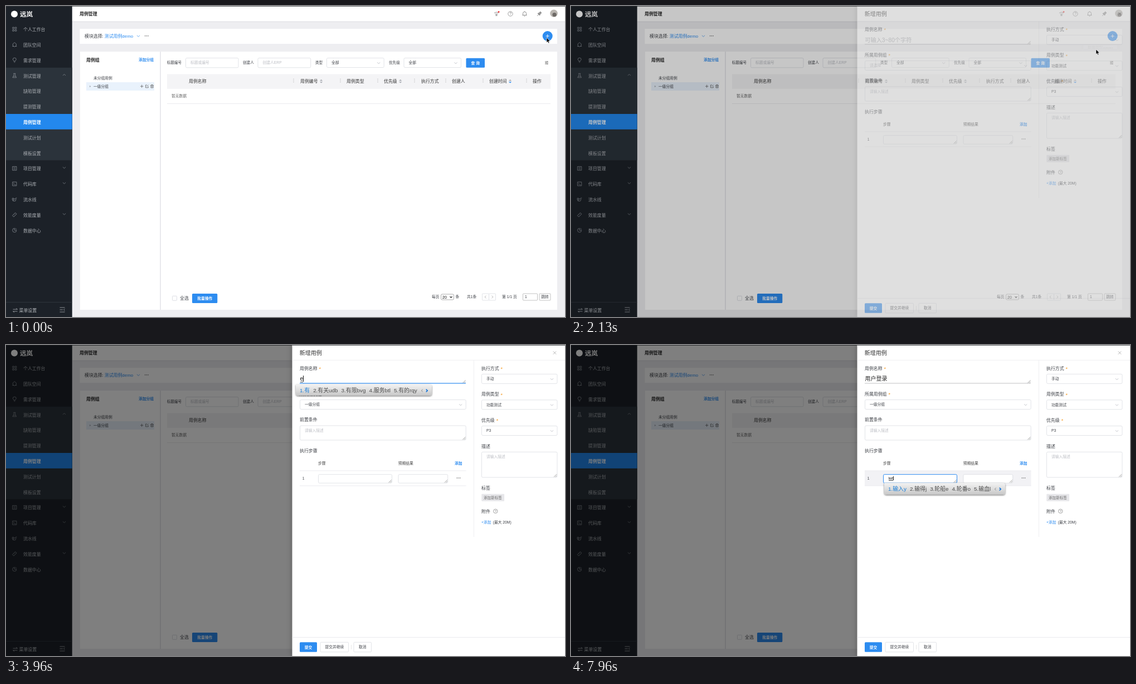
An HTML page that plays this animation: 1003x559 px, repeating every 8000 ms.

```html
<!DOCTYPE html>
<html lang="zh-CN">
<head>
<meta charset="utf-8">
<title>新增用例</title>
<style>
html, body { margin: 0; width: 100%; height: 100%; overflow: hidden; }
body { position: relative; background: #eeeef1; font-family: "Liberation Sans", "Noto Sans CJK SC", "Noto Sans CJK", sans-serif; }
svg { position: absolute; left: 0; top: 0; display: block; }
svg text { white-space: pre; }
.field { position: absolute; white-space: nowrap; line-height: 14px; color: #222; }
.field u { text-decoration: none; box-shadow: 0 1px #444; }
.field i { display: inline-block; width: .8px; height: 1.15em; margin-left: .4px; background: #111; vertical-align: -.2em; }
#title { left: 527.5px; top: 54px; font-size: 10px; }
#step { left: 569.5px; top: 233px; font-size: 6.75px; }
#ime {
  position: absolute; display: flex; gap: 6px; align-items: center; height: 20.5px; padding: 0 6px 0 7px;
  font-size: 9.9px; color: #4a4a4a; white-space: nowrap; border-radius: 1px 4px 4px 4px;
  background: linear-gradient(#f2f2f2, #dcdcdc 55%, #c6c6c6); box-shadow: 0 1px 3px rgba(0,0,0,.55);
}
#ime span:first-child { color: #1b7fd8; }
#ime svg { position: static; }
</style>
</head>
<body>
<svg id="scene" width="1003" height="559"></svg>
<div class="field" id="title"></div>
<div class="field" id="step"></div>
<div id="ime"></div>
<svg id="pointer" width="1003" height="559">
  <path id="arrow" d="M0 0V8.7L2 6.9L3.4 10L4.9 9.3L3.6 6.3H6.3Z" fill="#000" stroke="#fff" stroke-width=".6"/>
  <path id="beam" d="M-2-4.2Q0-4.2 0-3V3Q0 4.2-2 4.2M2-4.2Q0-4.2 0-3M0 3Q0 4.2 2 4.2M-1 1H1" fill="none" stroke="#111" stroke-width=".9"/>
</svg>
<script>
const $ = id => document.getElementById(id);
const BLUE = '#2d8cf0', INK = '#3c3f45', SOFT = '#bcbec4', EDGE = '#d6d9df', S = 6.75, M = 7.9;

// Drawing helpers; text is placed by its left edge and vertical centre.
const text = (x, y, s, size = S, fill = INK, bold, mid) =>
  `<text x="${x}" y="${y + size * .37}" font-size="${size}" fill="${fill}"${bold ? ' font-weight="bold"' : ''}${mid ? ' text-anchor="middle"' : ''}>${s}</text>`;
const rect = (x, y, w, h, fill, edge = 'none', r = 0, extra = '') =>
  `<rect x="${x}" y="${y}" width="${w}" height="${h}" rx="${r}" fill="${fill}" stroke="${edge}" stroke-width=".7" ${extra}/>`;
const path = (x, y, d, color = '#666', w = .8, fill = 'none') =>
  `<path transform="translate(${x} ${y})" d="${d}" fill="${fill}" stroke="${color}" stroke-width="${w}"/>`;
const circle = (x, y, r, fill, edge = 'none') =>
  `<circle cx="${x}" cy="${y}" r="${r}" fill="${fill}" stroke="${edge}" stroke-width=".7"/>`;
const chevron = (x, y, color = '#a9adb5', up) => path(x, y, up ? 'M-2.6 1.2L0-1.2L2.6 1.2' : 'M-2.6-1.2L0 1.2L2.6-1.2', color, .7);
const dots = (x, y, color = '#555') => [-2.7, 0, 2.7].map(d => circle(x + d, y, .75, color)).join('');
const line = (x, y, w, color = '#e6e7ea') => rect(x, y, w, .8, color);
const button = (x, y, w, h, s) => rect(x, y, w, h, BLUE, 'none', 1.5) + text(x + w / 2, y + h / 2, s, S, '#fff', 1, 1);
const input = (x, y, w, h, s = '', color = SOFT) => rect(x, y, w, h, '#fff', EDGE, 2) + text(x + 8.5, y + Math.min(h / 2, 8.5), s, S, color);
const select = (x, y, w, s) => input(x, y, w, 17, s, INK) + chevron(x + w - 9.5, y + 9);
const grip = (x, y) => path(x, y, 'M-5 0L0-5M-2.3 0L0-2.3', '#777', .7);
const area = (x, y, w, h, s) => input(x, y, w, h, s) + grip(x + w - .8, y + h - .8);
const label = (x, y, s, star) => text(x, y, s, M) + (star ? text(x + s.length * M + 3, y + 1, '*', 9, '#f59a23') : '');
const help = (x, y, r) => circle(x, y, r, 'none', '#777') + text(x, y, '?', r * 1.6, '#777', 0, 1);

function sidebar() {
  const menu = [
    ['个人工作台', 'M-3.5-3.5h2.6v2.6h-2.6zM.9-3.5h2.6v2.6H.9zM-3.5.9h2.6v2.6h-2.6zM.9.9h2.6v2.6H.9z'],
    ['团队空间', 'M0-3.8L3-1.5V2L0 3.8L-3 2V-1.5ZM-4 3H-1M1 3H4'],
    ['需求管理', 'M-1.4 2V1Q-3 0-3-1.2A3 3 0 0 1 3-1.2Q3 0 1.4 1V2ZM-1 3.8H1'],
    ['测试管理', 'M-2-3.8H2M-1.2-3.8V-.8L-3.4 3.6H3.4L1.2-.8V-3.8M-2.2 1.2H2.2', 1],
    ['缺陷管理'], ['提测管理'], ['用例管理'], ['测试计划'], ['模板设置'],
    ['项目管理', 'M-3.6-3.4H3.6V3.4H-3.6ZM-2-1.2H2M-2 1.2H2', 2],
    ['代码库', 'M-3.6-3.4H3.6V3.4H-3.6ZM-2-1.4L-.6 0L-2 1.4M0 1.6H2', 2],
    ['流水线', 'M-4-2H-1.5V1H-4ZM-1.5-.5H1L2.5-2.5H4M-2.8 1V3H1.5L3-1'],
    ['效能度量', 'M-3.8 1.4L1.4-3.8L3.8-1.4L-1.4 3.8ZM-1.5-.9L-.4.2M.4-2.4L1.2-1.6', 2],
    ['数据中心', 'M3.6 0A3.6 3.6 0 1 1 0-3.6V0ZM1.4-3.5A3.6 3.6 0 0 1 3.5-1.4'],
  ];
  let out = rect(0, 0, 118.7, 559, '#1c2128') + rect(0, 110.8, 118.7, 166.5, '#2b333b') + rect(0, 194, 118.7, 27.8, '#2388ee');
  out += circle(15, 14.5, 6, '#fff') + text(25, 14.5, '远岚', 11.5, '#fff', 1);
  menu.forEach(([name, icon, fold], i) => {
    const y = 42.2 + i * 27.8, on = i == 6;
    out += text(31, y, name, M, on ? '#fff' : '#a9adb2', on);
    if (icon) out += path(15.3, y - .5, icon, '#8d9298', .75);
    if (fold) out += chevron(104.5, y - 1.8, '#8d9298', fold == 1);
  });
  return out + line(0, 532, 118.7, '#343a41') + text(23.5, 547, '菜单设置', M, '#b4b8bc') +
    path(16.5, 547, 'M-4-1.8H4M1.5-3.6L4-1.8M4 1.8H-4L-1.5 3.6', '#a9adb2') + path(101, 546, 'M-4.5-4H4.5M-4.5 0H1M-4.5 4H4.5M4.5-1.8L2.5 0L4.5 1.8', '#a9adb2');
}

function page() {
  let out = rect(118.7, 0, 884.3, 559, '#eeeef1') + rect(118.7, 27.5, 884.3, 1.5, '#e2e2e6') + rect(118.7, 0, 884.3, 27.5, '#fff');
  out += text(132, 14, '用例管理', M, '#222', 1);
  out += path(880, 14, 'M-4-1.5Q0-4.5 4-1.5M-2.4.4H2.6M0 .4V4M-2 3H2', '#777') + circle(884, 10.5, 1.5, '#ee3b3b') + help(905, 14, 4.2);
  out += path(930.5, 14, 'M-4 2.6H4M-3 2.6V-.6A3 3 0 0 1 3-.6V2.6M-1 4.2H1M0-3.6V-4.5', '#777') + path(957, 14, 'M-4 4L-1 1M-3-.6L.6 3L2-.2L4-1.6L1.6-4L.2-2Z', '#777', .7, '#999');
  out += circle(983, 13.3, 6.8, '#b9b5b0') + circle(984, 15.5, 3.6, '#6d6966');

  out += rect(132.5, 41, 856.5, 27, '#fff') + text(141, 53.7, '模块选择:', M) + text(176.8, 53.7, '测试用例demo', M, BLUE);
  out += chevron(237.5, 54, BLUE) + dots(252.3, 53.7) + circle(971.7, 54, 9, BLUE) + path(971.7, 54, 'M-3 0H3M0-3V3', '#fff', .9);

  out += rect(133, 82, 856, 464, '#fff') + rect(276.3, 82, 1.5, 464, '#e3e3e8');
  out += text(144, 97, '用例组', M, '#222', 1) + text(238, 96.3, '添加分组', S, BLUE, 1) + text(157, 129.3, '未分组用例');
  out += rect(144, 137, 122, 15, '#e9f2fc') + path(151, 144.5, 'M-1-1.8L1.2 0L-1 1.8Z', 'none', 0, '#a3a8b0') + text(157, 144.3, '一级分组');
  out += path(243.7, 144.3, 'M-2.7 0H2.7M0-2.7V2.7') + path(253, 144.3, 'M0-2.3H-2.5V2.5H2.3V0M-.6.6L2.6-2.6') + path(262, 144.3, 'M-2.8-1.8H2.8M-2-1.8V2.7H2V-1.8M-1-2.8H1M-.7-.4V1.4M.7-.4V1.4');

  [[288.7, '标题编号'], [425, '创建人'], [555, '类型'], [687, '优先级']].forEach(([x, s]) => out += text(x, 101.7, s, 6.6));
  out += input(322.5, 93.5, 94.5, 17.3, '标题或编号') + input(452, 93.5, 94.7, 17.3, '创建人ERP') + select(575.5, 93.5, 102.7, '全部') + select(714, 93.5, 102.5, '全部');
  out += button(825.5, 93.8, 33.5, 17, '查 询') + path(970, 102, 'M-3-2.2H3M-3 0H3M-3 2.2H3M1-3V-1.4M-1-.8V.8M1 1.4V3', '#555', .7);

  out += rect(289, 122.5, 688, 26.3, '#f4f4f6');
  [[328, '用例名称'], [528, '用例编号', 1], [611, '用例类型'], [678, '优先级', 1], [745, '执行方式'], [800, '创建人'], [867, '创建时间', 2], [945, '操作']].forEach(([x, s, sort]) => {
    out += text(x, 135.3, s, M, '#333');
    if (!sort) return;
    const sx = x + s.length * M + 6;
    out += path(sx, 135.3, 'M-2.6-.9L0-3.2L2.6-.9Z', 'none', 0, '#a3a6ad') + path(sx, 135.3, 'M-2.6.9L0 3.2L2.6.9Z', 'none', 0, sort == 2 ? BLUE : '#a3a6ad');
  });
  [516, 600, 667, 733, 789, 856, 934].forEach(x => [-2.7, 0, 2.7].forEach(d => out += circle(x, 134 + d, .5, '#888')));
  out += text(297, 161.3, '暂无数据', S, '#666') + line(289, 175, 688);

  out += rect(298.5, 521.3, 8, 8, '#fff', '#cfd2d8', 1) + text(312, 525, '全选', M) + button(334, 517, 45.3, 17, '批量操作');
  out += text(764, 523, '每页') + rect(780.5, 518, 23, 10, '#fff', '#888', 2) + text(783, 523, '20', 7, '#111') + path(798.5, 523, 'M-2-1L0 1.2L2-1', '#111', 1.1) + text(806.5, 523, '条');
  out += text(827, 523, '共1条') + rect(854.5, 517, 12, 12, '#fff', EDGE, 1) + rect(866.5, 517, 12, 12, '#fff', EDGE, 1);
  out += path(860.3, 523, 'M1.2-2.4L-1.2 0L1.2 2.4', '#999', .7) + path(872.7, 523, 'M-1.2-2.4L1.2 0L-1.2 2.4', '#999', .7) + text(890, 523, '第 1/1 页');
  out += rect(927.5, 517, 26, 12, '#fff', '#aaa', 1) + text(931, 523, '1') + rect(957, 517, 20, 12, '#fff', '#aaa', 1) + text(967, 523, '跳转', S, INK, 0, 1);
  return out + sidebar() + rect(0, 0, 1003, .8, '#33363a');
}

function drawer() {
  let out = rect(513.5, 0, 489.5, 559, '#fff', 'none', 0, 'style="filter:drop-shadow(0 0 5px rgba(0,0,0,.3))"') + rect(513.5, 0, 489.5, .8, '#33363a');
  out += text(526.8, 14, '新增用例', 10, '#333') + path(984.5, 14, 'M-2.7-2.7L2.7 2.7M2.7-2.7L-2.7 2.7', '#999', .7);
  out += line(513.5, 26.8, 489.5, '#ececef') + rect(839, 27, .8, 318, '#ececef') + line(513.5, 525, 489.5);
  out += label(527, 42, '用例名称', 1) + `<g id="hint">${text(527.3, 61, '可输入3~80个字符', 10.2, '#a9abb0')}</g>`;
  out += '<rect id="under" x="527" width="298"/>' + grip(824.5, 68.3);
  out += label(527, 87.7, '所属用例组', 1) + select(527.5, 98.5, 297.7, '') + `<g id="unset">${text(536, 107, '请选择', S, SOFT)}</g><g id="group">${text(536, 107, '一级分组')}</g>`;
  out += label(527, 134.5, '前置条件') + area(527.5, 145, 297.7, 26, '请输入描述') + label(527, 190, '执行步骤');
  out += text(560, 212.7, '步骤', S, '#444') + text(703.7, 212.7, '预期结果', S, '#444') + text(805, 212.7, '添加', S, BLUE, 1);
  out += rect(527, 226, 298.5, 27, '#fff', 'none', 0, 'id="row"') + line(527, 225.6, 298.5) + line(527, 252.6, 298.5) + text(531.8, 239.5, '1');
  out += rect(560.5, 232.7, 132, 15.5, '#fff', EDGE, 2, 'id="box"') + grip(691.7, 247.4) + area(704, 232.7, 88.7, 15.5) + dots(812, 239);

  out += label(853, 42, '执行方式', 1) + select(853.5, 52.3, 135.5, '手动') + label(853, 88.3, '用例类型', 1) + select(853.5, 98.8, 135.5, '功能测试');
  out += label(853, 135, '优先级', 1) + select(853.5, 145.5, 135.5, 'P3') + label(853, 182, '描述') + area(853.5, 192.3, 135.5, 45.7, '请输入描述');
  out += label(853, 257, '标签') + rect(853.3, 267.7, 40.8, 13, '#e7e7ea', 'none', 1) + text(857, 274.3, '添加新标签', 6.6, '#666');
  out += label(853, 299.3, '附件') + help(878.3, 298.7, 3.7) + text(853, 318.5, '+添加', S, BLUE) + text(873.7, 318.5, '(最大 20M)');
  out += button(527, 534.3, 31, 17.5, '提交') + rect(564, 534.3, 50.5, 17.5, '#fff', EDGE, 1.5) + text(589.3, 543, '提交并继续', S, INK, 0, 1);
  return out + rect(619, 539, .7, 8, '#ddd') + rect(624, 534.3, 31.5, 17.5, '#fff', EDGE, 1.5) + text(639.8, 543, '取消', S, INK, 0, 1);
}

const menu = rect(919, 70, 61.5, 34, '#fff', '#e4e6ea', 2, 'style="filter:drop-shadow(0 1px 3px rgba(0,0,0,.15))"') +
  text(927, 80, '新增用例') + text(927, 94, '新增xmind用例');
$('scene').innerHTML = page() + `<g id="menu">${menu}</g>` + rect(0, 0, 1003, 559, '#000', 'none', 0, 'id="mask"') + `<g id="drawer">${drawer()}</g>`;

// Time, committed text, keys being composed, candidate list.
const titleKeys = [
  [0, '', ''],
  [3960, '', 'e', '有 有关udb 有限bvg 服务btl 有的rqy'],
  [4250, '', 'et', '用 用户yn 用于gf 用品kk 及'],
  [4460, '', 'ety', '用户n 用语g 脉i 用诗f 脸w'],
  [4710, '用户', ''],
  [4880, '用户', 'w', '人 你qiy 什么ftc 会fcu 你的qrq'],
  [5050, '用户', 'wg', '全 合k 登ku 登录vi 偿i'],
  [5190, '用户', 'wgv', '登录i 例e 侄y 债u 倒j'],
  [5330, '用户登录', ''],
];
const stepKeys = [
  [0, '', ''],
  [7560, '', 'l', '国 轻c 输入wty 男l 四h'],
  [7750, '', 'lw', '输gj 输入ty 轮x 轮船te 转'],
  [7910, '', 'lwt', '输入y 输得j 轮船e 轮番o 输血l'],
];
// Pointer path: time, x, y.
const moves = [[0, 970, 57], [880, 970, 57], [1500, 942, 78], [2350, 942, 78], [2880, 586, 68], [3130, 578, 62], [5830, 578, 62], [6630, 575, 241], [8000, 575, 241]];
const FOCUS = 3400, NEXT = 7060;

const clamp = v => Math.max(0, Math.min(1, v));
const smooth = v => (v = clamp(v)) * v * (3 - 2 * v);
const last = (table, t) => table.filter(row => row[0] <= t).pop();
const show = (id, on) => $(id).style.display = on ? '' : 'none';

function type(id, keys, t, focused, since) {
  const [at, done, comp, list] = last(keys, t);
  const blink = focused && Math.floor((t - Math.max(at, since)) / 500) % 2 == 0;
  $(id).innerHTML = `${done}<u>${comp}</u>${blink ? '<i></i>' : ''}`;
  return focused && list;
}

function draw(t) {
  const open = 1 - (1 - clamp((t - 200) / 250)) ** 3;
  const scale = t < 1000 ? open : 1 - clamp((t - 1960) / 220);
  $('menu').setAttribute('transform', `translate(0 ${70 * (1 - scale)}) scale(1 ${scale})`);
  $('menu').style.opacity = scale;

  const fade = smooth((t - 1950) / 390);
  $('mask').style.opacity = fade * .5;
  $('drawer').style.opacity = fade;
  show('unset', t < 2260);
  show('group', t >= 2260);

  const inTitle = t >= FOCUS && t < NEXT, inStep = t >= NEXT;
  const list = type('title', titleKeys, t, inTitle, FOCUS) || type('step', stepKeys, t, inStep, NEXT);
  if (!inStep) $('step').innerHTML = '';
  show('hint', t < titleKeys[1][0]);
  $('under').setAttribute('y', inTitle ? 68.2 : 68.5);
  $('under').setAttribute('height', inTitle ? 1.2 : .7);
  $('under').setAttribute('fill', inTitle ? BLUE : '#a5a7ab');

  const i = Math.max(1, moves.findIndex(m => m[0] > t));
  const [t0, x0, y0] = moves[i - 1], [t1, x1, y1] = moves[i];
  const k = smooth((t - t0) / (t1 - t0)), x = x0 + (x1 - x0) * k, y = y0 + (y1 - y0) * k;
  const hidden = t >= 3960 && t < 5830 || t >= 7560;
  const drawn = t > 2300;
  const beam = drawn && x < 692 && (y > 52 && y < 67.5 || y > 145 && y < 171 || y > 232);
  show('arrow', !hidden && !beam);
  show('beam', !hidden && beam);
  $('arrow').setAttribute('transform', `translate(${x} ${y})`);
  $('beam').setAttribute('transform', `translate(${x} ${y})`);
  $('row').setAttribute('fill', drawn && y > 226 ? '#f2f2f5' : '#fff');
  $('box').setAttribute('stroke', inStep ? BLUE : drawn && y > 232 ? '#a2a5ab' : EDGE);
  $('box').setAttribute('stroke-width', inStep ? 1 : .7);

  show('ime', list);
  if (list) {
    const box = $(inStep ? 'step' : 'title').querySelector('u').getBoundingClientRect();
    $('ime').style.left = box.left - 7.5 + 'px';
    $('ime').style.top = (inStep ? 248 : 70.8) + 'px';
    $('ime').innerHTML = list.split(' ').map((s, n) => `<span>${n + 1}.${s}</span>`).join('') +
      `<svg width="14" height="8">${path(2.5, 5, 'M1.3-2.2L-1.3 0L1.3 2.2', '#888', .9)}${path(11, 5, 'M-1.3-2.4L1.3 0L-1.3 2.4', '#0a6fd8', 1.5)}</svg>`;
  }
}

const start = performance.now();
(function tick() {
  draw((performance.now() - start) % 8000);
  requestAnimationFrame(tick);
})();
</script>
</body>
</html>
```
